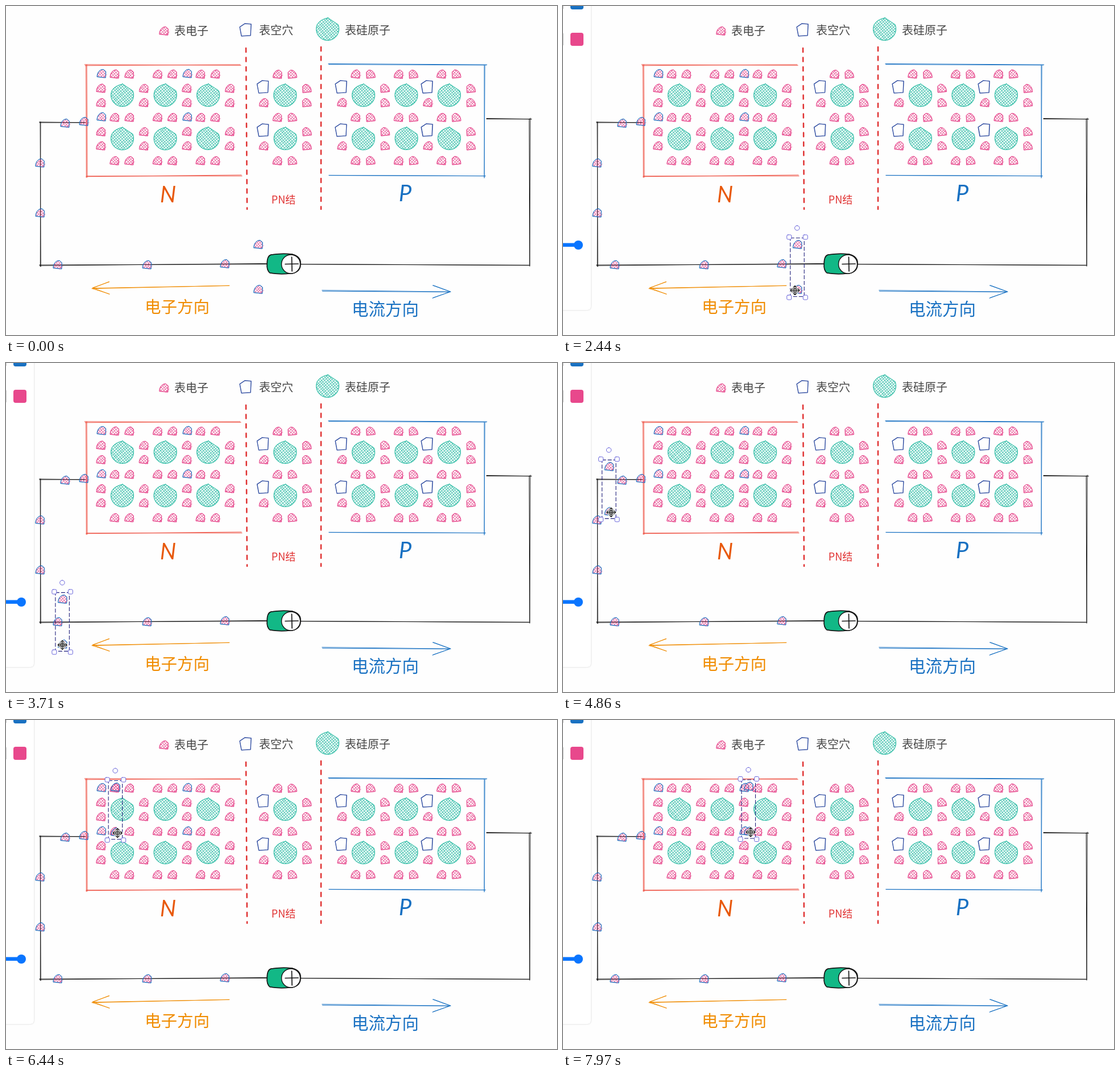
An HTML page with a canvas for the animation above (7.99 s loop, 969 by 578 pixels).

```html
<!DOCTYPE html>
<html lang="zh">
<head>
<meta charset="utf-8">
<style>
  html, body { margin: 0; width: 100%; height: 100%; overflow: hidden; background: #fefefe; }
  canvas { display: block; width: 969px; height: 578px; }
</style>
</head>
<body>
<canvas id="stage" width="969" height="578"></canvas>
<script>
const W = 969, H = 578, LOOP = 7990;
const PINK = '#e64088', BLUE = '#1971c2', NAVY = '#25439c', TEAL = '#22b8a0';
const RED = '#e03131', CORAL = '#ee4a3c', ORANGE = '#f08c00', BLACK = '#151515', VIOLET = '#6965db';

const screen = document.getElementById('stage').getContext('2d');
const scene = document.createElement('canvas');
scene.width = W;
scene.height = H;
let g = scene.getContext('2d');

let seed = 11;
const rnd = () => (seed = (seed * 16807) % 2147483647) / 2147483647;
const jit = a => (rnd() * 2 - 1) * a;

// ---- sketch helpers ----
function pen(color, width) {
  g.strokeStyle = color;
  g.lineWidth = width;
  g.lineCap = g.lineJoin = 'round';
}

function line(x1, y1, x2, y2) {
  g.beginPath();
  g.moveTo(x1, y1);
  g.lineTo(x2, y2);
  g.stroke();
}

// two thin strokes whose ends wander apart
function sketch(color, x1, y1, x2, y2) {
  pen(color, 0.95);
  for (let i = 0; i < 2; i++) line(x1 + jit(1.2), y1 + jit(1.2), x2 + jit(1.2), y2 + jit(1.2));
}

function arrow(color, x1, y1, x2, y2, back) {
  sketch(color, x1, y1, x2, y2);
  sketch(color, x2, y2, x2 + back, y2 - 10.5);
  sketch(color, x2, y2, x2 + back, y2 + 11);
}

function hatch(path, r, gap, color, width) {
  g.save();
  g.clip(path);
  pen(color, width);
  for (const a of [-0.72, 0.85]) {
    g.save();
    g.rotate(a);
    for (let v = -r; v <= r; v += gap) line(-r * 1.4, v + jit(0.6), r * 1.4, v + jit(0.6));
    g.restore();
  }
  g.restore();
}

function outline(path, color, width) {
  pen(color, width);
  g.stroke(path);
  g.save();
  g.translate(jit(0.7), jit(0.7));
  g.globalAlpha = 0.55;
  g.stroke(path);
  g.restore();
}

function at(x, y, draw) {
  g.save();
  g.translate(x, y);
  draw();
  g.restore();
}

function label(text, x, y, size, color, family = '"Noto Sans CJK SC Light", "Noto Sans CJK SC"', style = '300') {
  g.font = `${style} ${size}px ${family}, sans-serif`;
  g.fillStyle = color;
  g.textAlign = 'center';
  g.textBaseline = 'middle';
  g.fillText(text, x, y);
}

// ---- particles ----
const electronPath = new Path2D('M6.5 7L-8 5.5C-8-2-3-8 3-7.5L7-4Z');
const holePath = new Path2D('M-10-5L-1-11L10-10L9 10L-7 11Z');
const atomPath = new Path2D('M1-20L19-8A20 20 0 1 1-18-8Q-13-17 1-20Z');

function electron(x, y, color = PINK, flip = false) {
  at(x, y, () => {
    if (flip) g.scale(-1, 1);
    hatch(electronPath, 11, 3.5, PINK, 0.8);
    outline(electronPath, color, 1);
    if (!flip) {
      pen(PINK, 0.8);
      line(3, 7.5, 9, 1.5);
    }
  });
}

const hole = (x, y) => at(x, y, () => outline(holePath, NAVY, 1.1));

function atom(x, y) {
  at(x, y, () => {
    g.fillStyle = '#effaf8';
    g.fill(atomPath);
    hatch(atomPath, 22, 3.7, TEAL, 0.8);
    outline(atomPath, TEAL, 0.9);
  });
}

// A lattice of silicon atoms; N has spare electrons, the others lack some.
function lattice(left, columns, doped) {
  const pitch = 75.5;
  for (let row = 0; row < 3; row++) {
    const y = 120 + 76 * row;
    for (let k = 0; k <= columns; k++) {
      const ax = left + pitch * k, side = ax - 37, spare = k % 2 === 0, flip = !doped && !spare;
      if (k < columns) {
        electron(ax - 13, y);
        electron(ax + 13, y, PINK, !doped);
        if (row < 2) atom(ax, y + 37);
      }
      if (row === 2) continue;
      if (!doped && spare) hole(side - 2, y + 22);
      else electron(side, y + 25, PINK, flip);
      electron(side, y + 50, PINK, flip);
      if (doped && spare) electron(side + 1, y - 1, BLUE);
    }
  }
}

function battery() {
  const body = new Path2D('M466 437Q485 434 503 436Q519 440 518 454Q517 469 500 470Q480 472 464 469Q458 464 459 453Q459 439 466 437Z');
  g.fillStyle = '#12b886';
  g.fill(body);
  outline(body, BLACK, 1.4);
  g.beginPath();
  g.arc(501, 453.5, 16.5, 0, 7);
  g.fillStyle = '#fff';
  g.fill();
  pen(BLACK, 1.4);
  g.stroke();
  pen(BLACK, 1.7);
  line(491, 453.5, 514, 453);
  line(502.5, 441, 503, 466);
}

function drawScene() {
  g.fillStyle = '#fefefe';
  g.fillRect(0, 0, W, H);

  sketch(BLACK, 140, 205, 59, 205);
  sketch(BLACK, 61, 204, 61, 457);
  sketch(BLACK, 59, 456, 460, 453);
  sketch(BLACK, 518, 453, 921, 456);
  sketch(BLACK, 920, 457, 921, 198);
  sketch(BLACK, 924, 198, 844, 198);

  sketch(CORAL, 138, 104, 412, 103.5);
  sketch(CORAL, 141, 103, 142.5, 301);
  sketch(CORAL, 141, 299, 414, 297.5);
  sketch(BLUE, 568, 102.5, 845, 104);
  sketch(BLUE, 842, 104, 842, 301);
  sketch(BLUE, 567, 297, 843, 299);

  pen(RED, 2.5);
  g.setLineDash([7, 9.5]);
  line(422, 74, 424, 357);
  line(554, 72, 554, 357);
  g.setLineDash([]);

  arrow(ORANGE, 392, 492, 152, 495.5, 29);
  arrow(BLUE, 557, 500.5, 781, 502, -30);
  battery();

  lattice(204, 3, true);
  lattice(490.5, 1, false);
  lattice(628, 3, false);

  const circuit = [[137, 203], [104, 206], [60, 276], [60, 364], [91, 455], [248, 455], [385, 453]];
  for (const [x, y] of circuit) electron(x, y, BLUE);

  electron(278, 44);
  hole(421, 42);
  atom(565, 41);
  label('表电子', 326, 43, 20, '#444');
  label('表空穴', 475, 42, 20, '#444');
  label('表硅原子', 636, 42, 20, '#444');
  label('PN结', 488, 340, 18, RED);
  label('电子方向', 301, 528, 28.5, ORANGE);
  label('电流方向', 667, 532, 29.5, BLUE);
  label('N', 285, 333, 40, '#e8590c', 'Lato', 'italic');
  label('P', 702, 331, 40, BLUE, 'Lato', 'italic');
}

// ---- moving parts: key points as time, x, y ----
const drag = [
  [2380, 443, 390], [2440, 412, 390], [3170, 202, 389], [3710, 99, 386], [3980, 68, 362],
  [4300, 54, 290], [4860, 80.5, 153], [5500, 156, 99.5], [5600, 156, 99.5],
  [6410, 181, 89], [6440, 192, 89], [7200, 295, 88], [7970, 326, 87.5]
];
const aim = [
  [290, 331, -14], [760, 495, 396], [1250, 412, 520], [1580, 447, 496], [1760, 447, 496], [2200, 440, 498]
];
const MARQUEE = { from: 760, to: 1250, x: 495, y: 396 };

function track(keys, t) {
  const i = keys.findIndex(k => k[0] > t);
  const [, x, y] = keys.at(i < 0 ? -1 : 0);
  if (i < 1) return [x, y];
  const [t0, x0, y0] = keys[i - 1], [t1, x1, y1] = keys[i];
  const k = (t - t0) / (t1 - t0);
  return [x0 + (x1 - x0) * k, y0 + (y1 - y0) * k];
}

function box(x, y, w, h, r) {
  g.beginPath();
  g.roundRect(x, y, w, h, r);
  g.fill();
}

function swatch(y, color) {
  g.fillStyle = color;
  box(13, y, 23, 23, 4);
  g.fillStyle = '#ccc';
  g.fillRect(0, y + 1, 1, 21);
}

function panel() {
  g.save();
  g.shadowColor = 'rgba(0,0,0,.2)';
  g.shadowBlur = 3;
  g.fillStyle = '#fff';
  box(-20, -20, 69, 554, 6);
  g.restore();
  swatch(-17, BLUE);
  swatch(47, '#e8488c');
  g.fillStyle = '#0a75ff';
  g.fillRect(0, 416.5, 27, 6.5);
  box(19, 412, 16, 16, 8);
}

function selection(x, y) {
  pen('#20207c', 1.1);
  g.lineCap = 'butt';
  g.setLineDash([7, 3]);
  g.strokeRect(x - 12, y + 17.5, 24.5, 103);
  g.setLineDash([]);
  pen(VIOLET, 1);
  g.fillStyle = '#fff';
  for (const dx of [-14, 14.5])
    for (const dy of [16, 122]) {
      box(x + dx - 4, y + dy - 4, 8, 8, 2);
      g.stroke();
    }
  box(x - 4.2, y - 4.2, 8.4, 8.4, 4.2);
  g.stroke();
}

function marquee(x, y) {
  const { x: x0, y: y0 } = MARQUEE;
  g.fillStyle = 'rgba(0,0,200,.04)';
  g.fillRect(x0, y0, x - x0, y - y0);
  pen(VIOLET, 1);
  g.strokeRect(x0, y0, x - x0, y - y0);
}

const moveIcon = new Path2D('M-8 0H8M0-8V8M-5-3L-8 0L-5 3M5-3L8 0L5 3M-3-5L0-8L3-5M-3 5L0 8L3 5M-3-3H3V3H-3Z');
const arrowIcon = new Path2D('M0 0V16L4 12.5L7 18.5L9.5 17.5L6.5 11.5H11.5Z');

function pointer(x, y, moving) {
  const icon = moving ? moveIcon : arrowIcon;
  at(x, y, () => {
    pen('#fff', 3);
    g.stroke(icon);
    pen('#111', 1.1);
    g.stroke(icon);
    g.fillStyle = '#111';
    if (!moving) g.fill(icon);
  });
}

function frame(now) {
  const t = now % LOOP;
  seed = 77;
  g.drawImage(scene, 0, 0);
  const [x, y] = track(drag, t);
  electron(x + 1, y + 29, BLUE);
  electron(x + 1, y + 108, BLUE);
  if (t >= 1090) panel();
  if (t >= MARQUEE.to) selection(x, y);
  if (t >= 290) {
    const lead = Math.min(4, -4 + (t - 2380) / 310);
    const [px, py] = t < 2380 ? track(aim, t) : [x + lead, y + 109.5];
    if (t >= MARQUEE.from && t < MARQUEE.to) marquee(px, py);
    pointer(px, py, t >= 1500);
  }
  requestAnimationFrame(frame);
}

drawScene();
g = screen;
requestAnimationFrame(frame);
</script>
</body>
</html>
```
